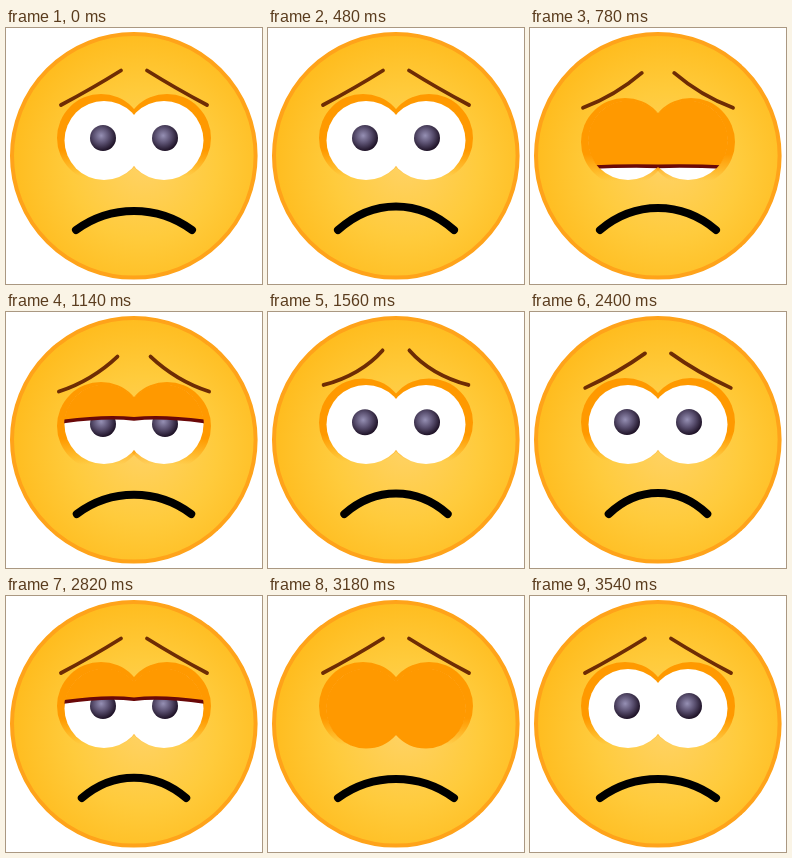
These frames come from a looping animation (256 by 256 pixels, 4.2 s). An HTML page:

```html
<!DOCTYPE html>
<html lang="en">
<head>
<meta charset="utf-8">
<title>Sad face</title>
<style>
html, body { margin: 0; width: 100%; height: 100%; overflow: hidden; background: #fff; }
svg { display: block; width: 100vw; height: 100vh; }
</style>
</head>
<body>
<svg viewBox="0 0 256 256">
  <defs>
    <radialGradient id="skin" cx=".54" cy=".54" r=".6">
      <stop offset="0" stop-color="#ffd264"/>
      <stop offset=".5" stop-color="#ffcb3c"/>
      <stop offset="1" stop-color="#ffb918"/>
    </radialGradient>
    <linearGradient id="socket" gradientUnits="userSpaceOnUse" x1="0" y1="66" x2="0" y2="154">
      <stop offset=".64" stop-color="#ff9900"/>
      <stop offset=".94" stop-color="#ff9900" stop-opacity="0"/>
    </linearGradient>
    <radialGradient id="ball" cx=".43" cy=".41" r=".6">
      <stop offset="0" stop-color="#9690b4"/>
      <stop offset=".5" stop-color="#5a5070"/>
      <stop offset="1" stop-color="#1c1024"/>
    </radialGradient>
    <clipPath id="eyes">
      <circle cx="98" cy="112.5" r="40"/>
      <circle cx="158" cy="112.5" r="40"/>
    </clipPath>
  </defs>
  <circle cx="127.8" cy="127.8" r="121.8" fill="url(#skin)" stroke="#ffa31a" stroke-width="4"/>
  <g id="sockets" fill="url(#socket)">
    <circle cx="95" cy="110" r="44"/>
    <circle cx="161" cy="110" r="44"/>
  </g>
  <g fill="#fff">
    <circle cx="98" cy="112.5" r="39.5"/>
    <circle cx="158" cy="112.5" r="39.5"/>
  </g>
  <g id="pupils" fill="url(#ball)">
    <circle cx="97" cy="110" r="13"/>
    <circle cx="159" cy="110" r="13"/>
  </g>
  <g id="lids" clip-path="url(#eyes)">
    <path id="lid" fill="#ff9900"/>
    <path id="rim" fill="none" stroke="#6a0808" stroke-width="3.6"/>
  </g>
  <g fill="none" stroke="#6e2c04" stroke-width="3.8" stroke-linecap="round">
    <path id="browL"/>
    <path id="browR"/>
  </g>
  <path id="mouth" fill="none" stroke="#000" stroke-width="8" stroke-linecap="round"/>
</svg>
<script>
const LOOP = 4200, STEP = 60;
const $ = id => document.getElementById(id);
const draw = (id, d) => $(id).setAttribute('d', d);
const shift = (id, y) => $(id).setAttribute('transform', `translate(0 ${y})`);

// Brow poses: outer x, y, control x, y, inner x, y
const calm = [55, 77, 87, 60, 115, 42.5];
const low = [52.5, 80.5, 85, 69.5, 111, 45.5];
const high = [56, 72, 94, 62, 115, 37.5];

// Tracks of [time, values]
const brow = [[0, calm], [540, calm], [840, low], [1080, low], [1620, high], [1980, high], [2520, calm]];
// Sinking of the eye sockets
const sink = [[0, [0]], [540, [0]], [780, [4]], [1140, [4]], [1620, [0]]];
// Half width, height of the middle
const mouth = [[0, [58, 183]], [540, [58, 177.8]], [1080, [58, 183]], [1740, [49.3, 181]], [2640, [49.3, 181]], [3180, [58, 183]]];
const lid = [[0, [0]], [540, [0]], [840, [1]], [900, [1]], [1330, [0]], [2640, [0]], [3090, [1]], [3240, [1]], [3540, [0]]];

function at(track, t) {
  const i = track.findIndex(k => k[0] > t);
  if (i < 0) return track[track.length - 1][1];
  const [t0, a] = track[i - 1], [t1, b] = track[i];
  const p = (t - t0) / (t1 - t0);
  return a.map((v, j) => v + (b[j] - v) * p);
}

function render(t) {
  const b = at(brow, t);
  const curve = ([x, y, cx, cy, ex, ey]) => `M${x} ${y}Q${cx} ${cy} ${ex} ${ey}`;
  draw('browL', curve(b));
  draw('browR', curve(b.map((v, i) => i % 2 ? v : 256 - v)));

  const [drop] = at(sink, t);
  shift('sockets', drop);
  shift('pupils', drop / 2);

  const [w, peak] = at(mouth, t);
  const cy = 202 - (202 - peak) / 0.75, cw = w * 0.4;
  draw('mouth', `M${128 - w} 202C${128 - cw} ${cy} ${128 + cw} ${cy} ${128 + w} 202`);

  const [k] = at(lid, t);
  const y = 73 + 83 * k, c = y - 11 * (1 - k), mid = y - 5 * (1 - k);
  const edge = `M56 ${y}Q100 ${c} 128 ${mid}Q156 ${c} 200 ${y}`;
  $('lids').style.display = k > 0 ? '' : 'none';
  draw('rim', edge);
  draw('lid', edge + 'V60H56Z');
}

let start;
function tick(now) {
  start ??= now;
  render(Math.floor((now - start) % LOOP / STEP) * STEP);
  requestAnimationFrame(tick);
}
render(0);
requestAnimationFrame(tick);
</script>
</body>
</html>
```
